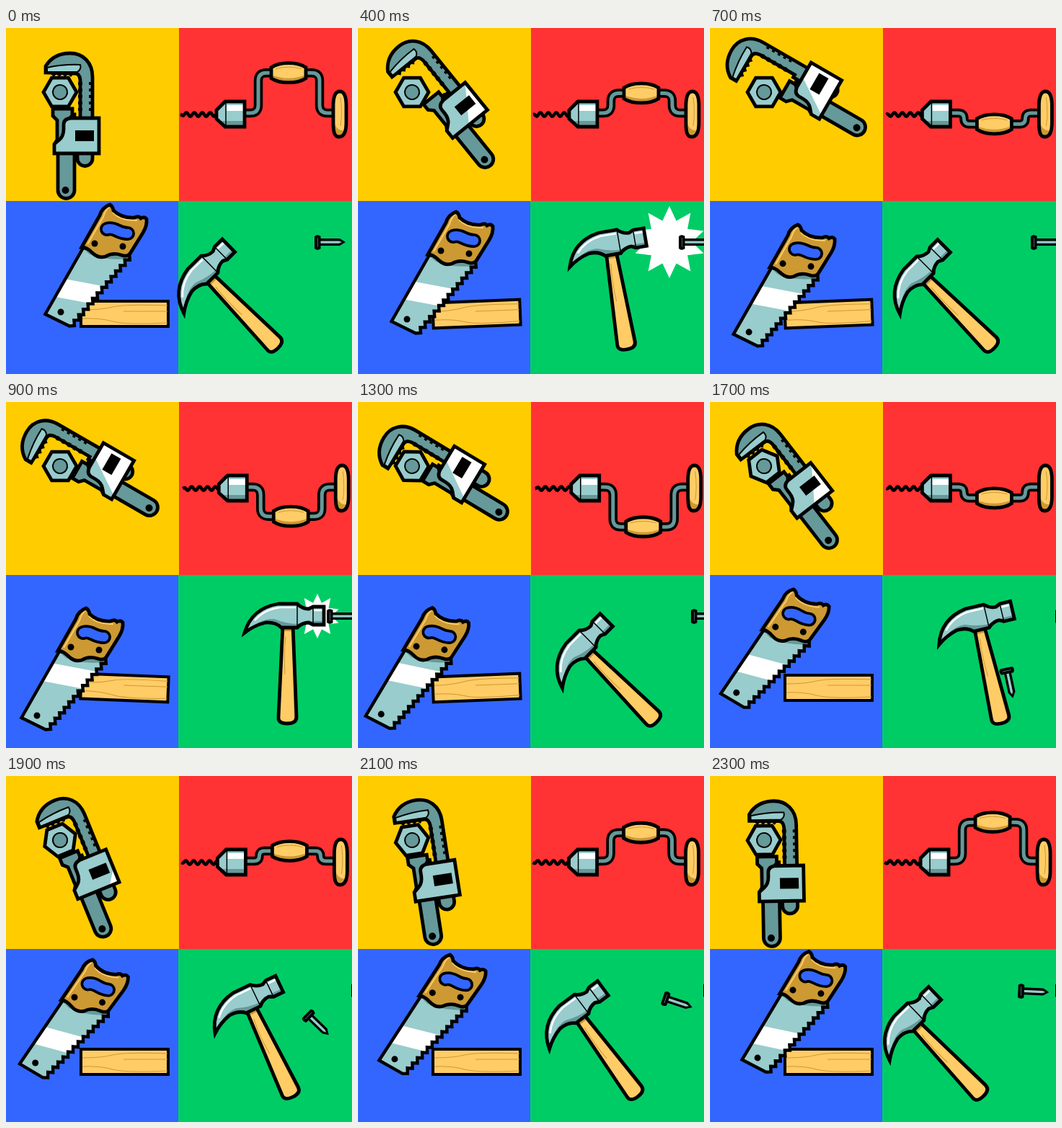
Animation, 480 px wide and 480 px high, one loop 2400 ms. Source, as an HTML page with a canvas:

```html
<!DOCTYPE html>
<html lang="en">
<head>
<meta charset="utf-8">
<title>Tools</title>
<style>
html, body { margin: 0; width: 100%; height: 100%; overflow: hidden; }
canvas { display: block; width: 100vw; height: 100vh; }
</style>
</head>
<body>
<canvas id="stage" width="480" height="480"></canvas>
<script>
const ctx = document.getElementById('stage').getContext('2d');
const STEPS = 24, STEP_MS = 100, TAU = Math.PI * 2;
const LIGHT = '#99cccc', MID = '#669999', WOOD = '#ffcc66', OAK = '#cc9933';
const BLUE = '#3366ff', INK = '#000', WHITE = '#fff';

const ease = x => (1 - Math.cos(Math.PI * Math.min(1, Math.max(0, x)))) / 2;
const rad = deg => deg * Math.PI / 180;

// Monotone cubic through [step, value] points
function track(k, pts) {
  const last = pts.length - 1;
  if (k >= pts[last][0]) return pts[last][1];
  let i = 0;
  while (k >= pts[i + 1][0]) i++;
  const secant = j => (pts[j + 1][1] - pts[j][1]) / (pts[j + 1][0] - pts[j][0]);
  const slope = j => {
    if (j === 0) return secant(0);
    if (j === last) return secant(last - 1);
    const a = secant(j - 1), b = secant(j);
    return a * b <= 0 ? 0 : 2 * a * b / (a + b);
  };
  const [x0, y0] = pts[i], [x1, y1] = pts[i + 1], w = x1 - x0, t = (k - x0) / w;
  const s = t * t * (3 - 2 * t);
  return y0 + (y1 - y0) * s + w * (slope(i) * t * (1 - t) ** 2 - slope(i + 1) * t * t * (1 - t));
}

function fill(d, color) {
  ctx.fillStyle = color;
  ctx.fill(new Path2D(d));
}

function line(d, width, color = INK) {
  ctx.lineWidth = width;
  ctx.strokeStyle = color;
  ctx.stroke(new Path2D(d));
}

function solid(d, color, detail, width = 4.8) {
  fill(d, color);
  if (detail) {
    ctx.save();
    ctx.clip(new Path2D(d));
    detail();
    ctx.restore();
  }
  line(d, width);
}

function dot(x, y, r, color = INK) {
  ctx.fillStyle = color;
  ctx.beginPath();
  ctx.arc(x, y, r, 0, TAU);
  ctx.fill();
}

// Draw with the point (px, py) moved to (x, y) and turned there
function pose(x, y, deg, px, py, draw) {
  ctx.save();
  ctx.translate(x, y);
  ctx.rotate(rad(deg));
  ctx.translate(-px, -py);
  draw();
  ctx.restore();
}

function ring(n, radius) {
  let d = '';
  for (let i = 0; i < n; i++) {
    const a = TAU * i / n, r = radius(i);
    d += (i ? 'L' : 'M') + r * Math.sin(a) + ' ' + -r * Math.cos(a);
  }
  return d + 'Z';
}

// ---- Wrench ----
const HEX = ring(6, () => 23);

function upperJaw() {
  solid('M55 62V53Q66 35 89 35C107 35 120 48 120 68V181A10.5 10.5 0 0 1 99 181V128H103V72Q102 63 96 63Z', MID);
  solid('M57 55Q80 50 103 51Q105 57 99 61H57Z', LIGHT, null, 2);
  fill('M60 61L66 68L70 64L74 68L78 64L82 68L86 64L90 68L96 61Z', INK);
  for (let y = 77; y < 122; y += 9) {
    line(`M100 ${y}H106M115 ${y}H121`, 4);
  }
}

function lowerJaw(angle) {
  solid('M72 120V225A11.5 11.5 0 0 0 95 225V120Z', MID);
  dot(82.5, 225, 5);
  solid('M65 112H92V121L88 126V172H68V160L71 155V128L65 122Z', MID);
  const x = 150 - angle * 1.1;
  solid('M90 125H129V174H67V161L74 155Q80 150 80 140V134Q80 126 90 125Z', LIGHT, () =>
    fill(`M${x + 25} 120H200V180H${x - 15}Z`, WHITE));
  fill('M96 142H122V157H96Z', INK);
}

function wrench(k) {
  const back = k >= 12;
  const angle = 60 * (back ? 1 - ease((k - 12) / 12) : ease(k / 6.7));
  const slide = track(k, [[0, 0], [4, 11.7], [6, 17], [9, 4], [12, 0]]);
  const open = track(k, [[0, 0], [4, 7], [6, 15], [9, 10], [12, 0]]);
  pose(75, 89, -angle, 75 - slide, 89, () => {
    ctx.save();
    ctx.translate(0, -open);
    upperJaw();
    ctx.restore();
    lowerJaw(angle);
  });
  pose(75, 89, 30 - (back ? angle : 0), 0, 0, () => {
    solid(HEX, MID, () => dot(0, 0, 20.5, LIGHT));
    dot(0, 0, 11);
    dot(0, 0, 9, MID);
  });
}

// ---- Brace drill ----
function drill(k) {
  const turn = TAU * k / STEPS;
  const y = 118.7 - 56.5 * Math.cos(turn);
  ctx.save();
  ctx.translate(1.9 - 1.9 * Math.cos(turn), 0);

  let bit = 'M242 120';
  for (let x = 243; x <= 292; x++) {
    bit += `L${x} ${120 + 2.6 * Math.min(1, (x - 242) / 5) * Math.sin((x - 242) * TAU / 11 - turn)}`;
  }
  line(bit, 4.5);

  const h = y - 118, r = Math.min(11, Math.abs(h) / 2), v = Math.sign(h) * r;
  const rod = `M331 118H${350 - r}Q350 118 350 ${118 + v}V${y - v}Q350 ${y} ${350 + r} ${y}H370` +
    `M414 ${y}H${435 - r}Q435 ${y} 435 ${y - v}V${118 + v}Q435 118 ${435 + r} 118H455`;
  line(rod, 12.5);
  line(rod, 5, MID);

  solid('M292 114L304 102H331V137H304L292 126Z', LIGHT, () => {
    fill('M288 129H334V140H288Z', MID);
    fill('M306 107H334V115H306Z', WHITE);
    line('M305 100V140', 1.5);
  });

  ctx.save();
  ctx.translate(0, y - 61.5);
  solid('M368 54C380 46 404 46 416 54V69C404 77 380 77 368 69Z', WOOD, () => {
    fill('M365 63Q392 75 419 63V85H365Z', OAK);
    line('M374 56Q392 51 410 56', 1, OAK);
  });
  ctx.restore();

  solid('M463 88C470 88 472 98 472 108V131C472 143 470 151 462 151C455 151 454 143 454 131V108C454 97 456 88 463 88Z', WOOD, () => {
    fill('M453 122Q456 145 472 142V156H453Z', OAK);
    line('M464 96Q467 118 464 136', 1, OAK);
  });
  ctx.restore();
}

// ---- Saw and plank ----
let blade = 'M107 305L54.5 397L88 413.5';
for (let i = 0; i < 13; i++) {
  const x = 88 + i * 6.4, y = 413 - i * 7.6;
  blade += `L${x + 7} ${y}L${x + 6.4} ${y - 7.6}`;
}
blade += 'Z';

function plank(k) {
  const tilt = k > 0 && k <= 13 ? [2.3, -2.3, 0][k % 3] : 0;
  pose(165, 397, tilt, 165, 397, () => {
    solid('M104 379H225V414H104Z', WOOD, null, 4);
    line('M106 391Q132 391 148 387T224 385M163 393H224M106 403Q130 402 148 407T224 409', 1, OAK);
  });
}

function saw(k) {
  const x = track(k, [[0, 123], [4, 115], [9, 90], [11, 80], [12, 80], [13, 81], [15, 87], [19, 95], [23, 115], [24, 123]]);
  const y = track(k, [[0, 299], [4, 309], [9, 340], [11, 350], [12, 341], [13, 339], [15, 319], [19, 307], [23, 297], [24, 299]]);
  const tilt = track(k, [[0, 0], [11, 0], [13, 1.1], [15, 4], [19, 4.5], [23, 1.2], [24, 0]]);
  const shine = (y - 299) / 41;
  pose(x, y, tilt, 123, 299, () => {
    solid(blade, LIGHT, () => {
      fill('M100 300L116 314Q134 323 172 320L176 310Z', MID);
      ctx.translate(14 * shine, -27 * shine);
      fill('M60 344L150 361L138 386L48 369Z', WHITE);
    }, 4.4);
    dot(76, 394, 4.5);
    solid('M105 304L130 260Q133 249 144 245Q148 247 149 253Q160 264 178 263Q184 260 187 264Q192 261 195 265Q196 274 190 284L172 313Q168 318 160 315Q148 311 138 317Q128 320 120 312Q112 304 105 304Z', OAK, () => {
      line('M113 300L135 262Q138 252 143 249', 2, WOOD);
      line('M148 256Q160 268 182 267', 2, WOOD);
    });
    ctx.lineCap = 'round';
    const slot = 'M140 279Q146 277 154 281T169 285';
    line(slot, 20);
    line(slot, 12.5, BLUE);
    ctx.lineCap = 'butt';
    dot(123, 299, 4.5);
    dot(162, 303, 4.5);
  });
}

// ---- Hammer and nails ----
function nail(x, y, deg) {
  pose(x, y, deg, 449, 297, () => {
    fill('M435 292H463L471 297L463 302H435Z', INK);
    fill('M436 295.4H462L466 297L462 298.8H436Z', LIGHT);
    solid('M430 290Q432 288.5 434.5 290V305Q432 306.5 430 305Z', LIGHT, null, 4);
  });
}

function burst(r) {
  pose(432, 297, 0, 0, 0, () => fill(ring(20, i => i % 2 ? r * 0.62 : r), WHITE));
}

function hammer(x, deg) {
  pose(x, 440, -deg, 390, 440, () => {
    solid('M384 310H398L403 437Q403 446 390 446T378 437Z', WOOD, () => {
      fill('M380 310H402V318H380Z', OAK);
      fill('M397 320L400 448H405V320Z', OAK);
      line('M388 325Q385 350 387 378', 1, OAK);
    });
    solid('M331 320Q341 286 378 280H404Q411 287 420 287L426 284H441V309H426L420 306Q411 306 404 313H382Q374 305 360 306Q344 310 331 320Z', LIGHT, () => {
      fill('M331 322Q350 300 372 301Q390 308 404 308Q416 303 442 304V316H331Z', MID);
      line('M345 303Q358 288 380 285H402', 2.5, WHITE);
      line('M427 289H440', 2.5, WHITE);
      line('M404 278V315M426 282V311', 1.5);
    });
  });
}

const SWING = [0, 9.6, 26, 44.5, 45, 26];

function hammering(k) {
  const x = track(k, [[0, 373], [4, 372], [7, 390], [10, 390], [13, 410], [15, 408], [19, 395], [23, 375], [24, 373]]);
  const phase = (k + 3) % 6;
  const deg = k <= 15 ? SWING[phase] : track(k, [[15, 0], [19, 25.5], [23, 44], [24, 45]]);
  const hits = Math.min(3, Math.floor((k + 2) / 6));

  if (k >= 3 && k <= 16 && phase < 2) burst(phase ? 50 : 31);
  nail(449 + 17 * hits, 297, 0);
  if (k >= 16) {
    // the next nail rises from behind the handle
    const d = ((STEPS - k) / 5) ** 2;
    nail(449 - 17 * d, 297 + 47 * d, 44 * ((STEPS - k) / 5) ** 1.7);
  }
  hammer(x, deg);
}

function draw(k) {
  ['#ffcc00', '#ff3333', BLUE, '#00cc66'].forEach((color, i) => {
    const left = [0, 240, 0, 239][i];
    ctx.fillStyle = color;
    ctx.fillRect(left, (i >> 1) * 240, 480 - left, 240);
  });
  wrench(k);
  drill(k);
  plank(k);
  saw(k);
  hammering(k);
}

function tick() {
  draw(Math.floor(performance.now() / STEP_MS) % STEPS);
  requestAnimationFrame(tick);
}
tick();
</script>
</body>
</html>
```
